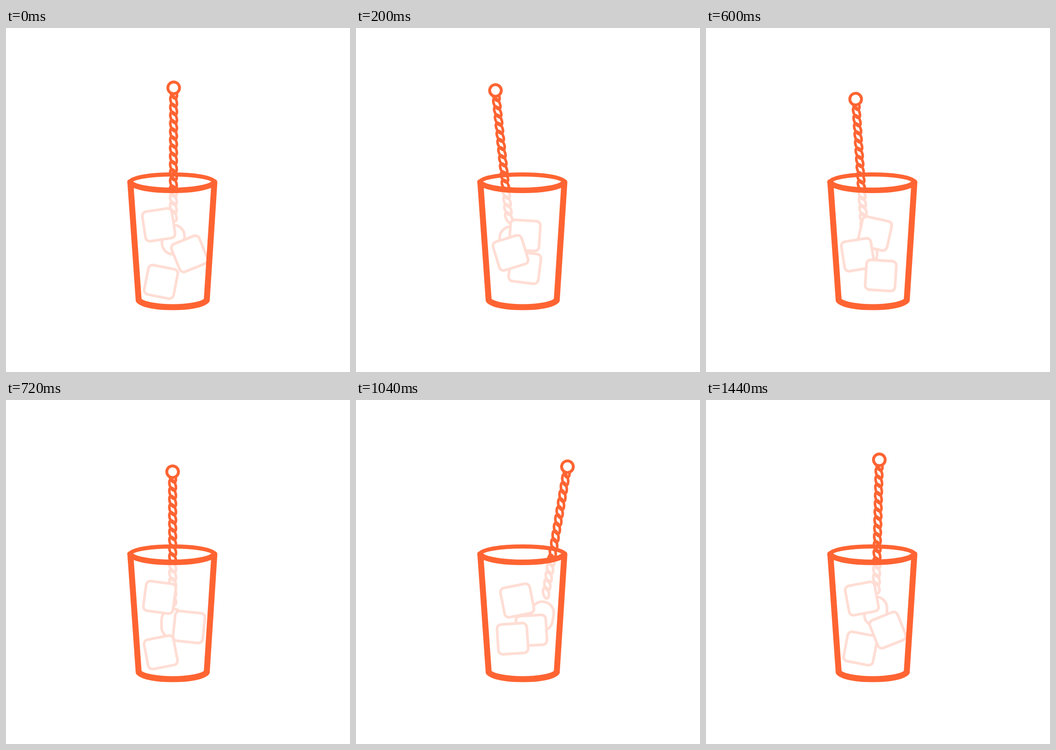
Write an HTML page that moves like this. It is 748 px wide and 748 px high and loops after 1480 ms.

```html
<!DOCTYPE html>
<html lang="en">
<head>
<meta charset="utf-8">
<title>Stirred drink</title>
<style>
  html, body { margin: 0; height: 100%; overflow: hidden; background: #fff; }
  svg { display: block; width: 100vw; height: 100vh; }
  g { fill: none; stroke-linecap: round; stroke-linejoin: round; }
  .solid { stroke: #ff6432; }
  .pale { stroke: #ffddd4; }
  .ice, .ring { fill: #fff; }
</style>
</head>
<body>
<svg viewBox="0 0 748 748">
  <defs>
    <clipPath id="above"><path d="M0 0H748V335H454C438 359 285 359 269 335H0Z"/></clipPath>
    <clipPath id="below"><path d="M0 340H748V748H0Z"/></clipPath>
    <g id="spoon">
      <g id="rope" stroke-width="5.8"></g>
      <circle class="ring" r="12.7" stroke-width="6.2"/>
      <rect x="-24.5" y="298" width="49" height="64" rx="24.5" stroke-width="5.8"/>
    </g>
    <rect id="cube" class="ice" x="-32.5" y="-32.5" width="65" height="65" rx="9.5" stroke-width="5.8"/>
  </defs>
  <g class="solid"><path d="M269 335C280 313 443 313 454 335" stroke-width="9"/></g>
  <g class="pale">
    <g clip-path="url(#below)"><use href="#spoon" class="stirrer"/></g>
    <use href="#cube" class="block"/>
    <use href="#cube" class="block"/>
    <use href="#cube" class="block"/>
  </g>
  <g class="solid">
    <g clip-path="url(#above)"><use href="#spoon" class="stirrer"/></g>
    <path d="M270.5 337L288.5 592C305 612 420 612 436.5 592L453 337" stroke-width="13"/>
    <path d="M269.5 335C285 359 438 359 453.5 335" stroke-width="12"/>
  </g>
</svg>
<script>
const LOOP = 1480, LAP = LOOP / 2, STEP = 40;

// Each lap the cubes rest, then glide from place to place
const glideStarts = [90, 200, 400, 500, 600];

// Back to front; each cube also rocks around its tilt once per loop
const cubes = [
  { places: [[332, 428], [367, 451], [334, 421], [373, 416], [367, 447]],
    tilt: -1, swing: 15, phase: -30 },
  { places: [[337, 552], [367, 521], [396, 481], [342, 487], [330, 493]],
    tilt: 0, swing: 11, phase: 90 },
  { places: [[399, 491], [336, 489], [345, 549], [392, 533], [380, 538]],
    tilt: -8, swing: 14, phase: -90 },
];

const radians = degrees => degrees * Math.PI / 180;
const smooth = u => u * u * (3 - 2 * u);

// Rope: overlapping slanted links
document.getElementById('rope').innerHTML = Array.from({ length: 16 }, (_, i) =>
  `<ellipse rx="6.2" ry="12.5" transform="translate(0 ${11.2 + 17.8 * i}) rotate(-20)"/>`
).join('');

function spoonAt(turn) {
  const sharp = 0.995;   // near 1: almost a triangle wave
  const sway = Math.asin(sharp * Math.sin(turn + radians(1.5))) / Math.asin(sharp);
  const x = 366.5 - 107 * sway;
  const y = 143 - 13 * Math.cos(turn + radians(8));
  return [x, y, (x - 363) / 10];
}

function cubeAt({ places, tilt, swing, phase }, time, turn) {
  const lapTime = time % LAP;
  const i = Math.max(0, glideStarts.findLastIndex(start => start <= lapTime));
  const start = glideStarts[i], end = glideStarts[i + 1] ?? LAP;
  const u = smooth(Math.max(0, (lapTime - start) / (end - start)));
  const from = places[i], to = places[(i + 1) % places.length];
  const [x, y] = from.map((value, k) => value + (to[k] - value) * u);
  return [x, y, tilt + swing * Math.sin(turn + radians(phase))];
}

function place(node, [x, y, angle]) {
  node.setAttribute('transform', `translate(${x} ${y}) rotate(${angle})`);
}

const stirrers = document.querySelectorAll('.stirrer');
const blocks = document.querySelectorAll('.block');

function draw(now) {
  const time = Math.floor(now % LOOP / STEP) * STEP;
  const turn = time / LOOP * 2 * Math.PI;
  stirrers.forEach(node => place(node, spoonAt(turn)));
  blocks.forEach((node, i) => place(node, cubeAt(cubes[i], time, turn)));
}

const start = performance.now();
function frame() {
  draw(performance.now() - start);
  requestAnimationFrame(frame);
}
frame();
</script>
</body>
</html>
```
